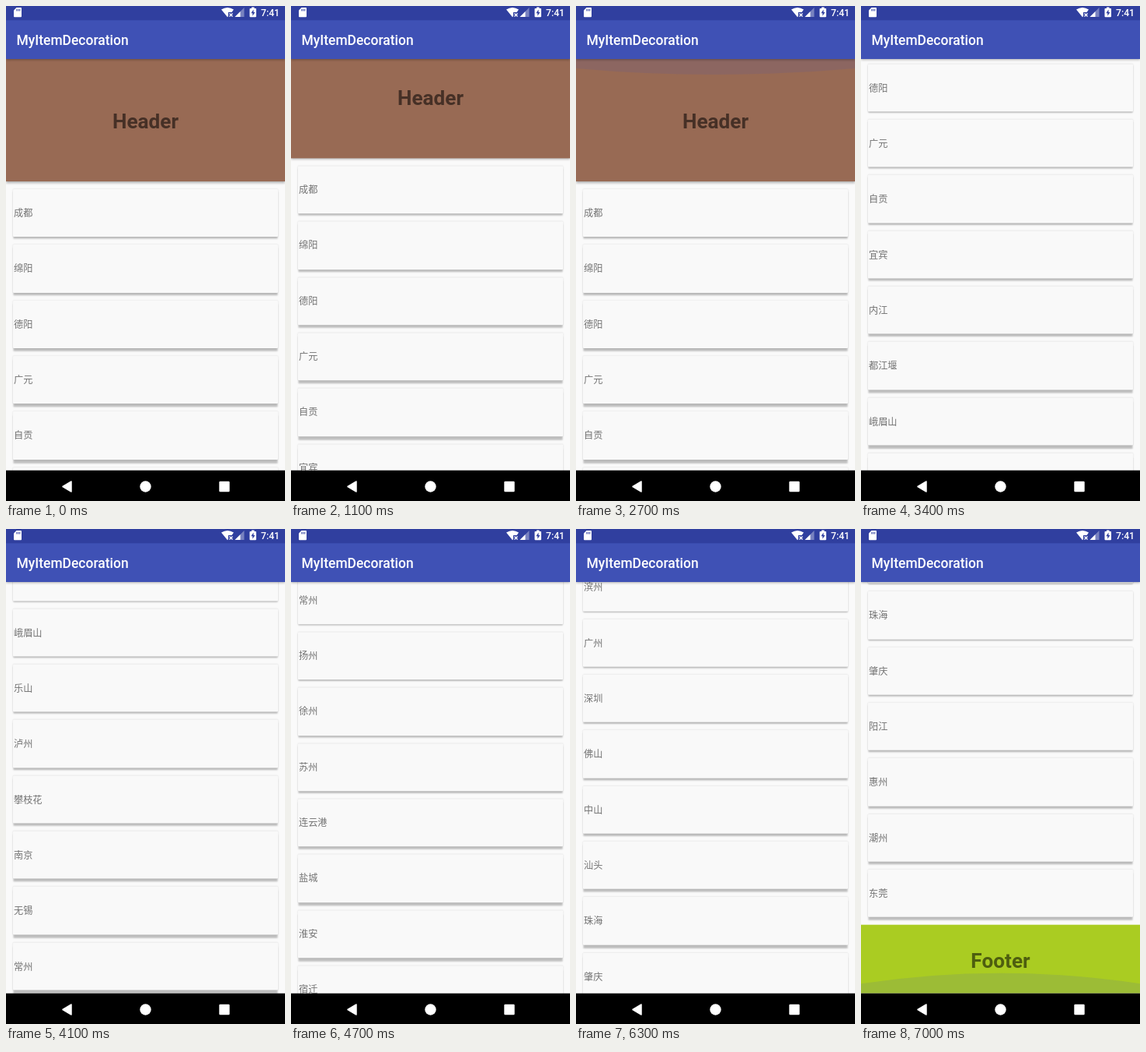
Recreate the animation shown at these times as an HTML page. Size 359x635 px, loop 8100 ms.

```html
<!DOCTYPE html>
<html lang="zh-CN">
<head>
<meta charset="utf-8">
<style>
html, body { margin: 0; width: 100%; height: 100%; overflow: hidden; background: #fafafa; }
#stage { position: absolute; left: 0; top: 0; width: 359px; height: 635px; overflow: hidden; background: #fafafa; }
#list { position: absolute; left: 0; top: 0; width: 359px; }
.card {
  position: absolute; left: 9px; width: 341px; height: 61.3px;
  background: #f9f9f9; border-radius: 1px; padding-left: 1px; box-sizing: border-box;
  font: 12.2px/61.3px "Noto Sans CJK SC", "Noto Sans CJK", sans-serif; color: rgba(0,0,0,.54);
}
.band {
  position: absolute; left: 0; width: 359px; padding-top: 2px; box-sizing: border-box;
  text-align: center; font: bold 26.2px Roboto, sans-serif; color: rgba(0,0,0,.54);
}
#header { top: 67.5px; height: 157px; line-height: 157px; background: #986a54; box-shadow: 0 2px 3px rgba(0,0,0,.3); }
#footer { height: 88px; line-height: 88px; background: #aacc22; }
svg { position: absolute; left: 0; top: 0; }
#bar { position: absolute; left: 0; top: 0; width: 359px; height: 67.5px; background: #3f51b5; box-shadow: 0 1px 3px rgba(0,0,0,.3); }
</style>
</head>
<body>
<div id="stage">
  <div id="list">
    <div id="header" class="band">Header</div>
    <div id="footer" class="band">Footer</div>
  </div>
  <svg width="359" height="635"><path id="glow" fill="#3f51b5" fill-opacity=".13"/></svg>
  <div id="bar"></div>
  <svg width="359" height="635" fill="#fff" font-family="Roboto, sans-serif" font-weight="500">
    <rect width="359" height="18.3" fill="#303f9f"/>
    <path d="M13.5 2H19q1 0 1 1V13.200q0 1-1 1H11q-1 0-1-1V5.500z"/>
    <path d="M13.800 4v2.500M15.800 4v2.500M17.800 4v2.500" stroke="#303f9f" stroke-width="1"/>
    <path d="M277 4.500Q285 -.5 293 4.500L290.500 8H286V13L285 14.200z"/>
    <path d="M287.500 9.500l4 4m0-4l-4 4" stroke="#fff" stroke-width="1.300"/>
    <path d="M306.500 2V14H294.500z" opacity=".35"/>
    <path d="M301.500 7V14H294.500z"/>
    <path d="M316 1.500h3.500V3H321q1 0 1 1v9.200q0 1-1 1H314.500q-1 0-1-1V4q0-1 1-1H316z"/>
    <path d="M318.500 4.500L315.300 9.300H317.300V12.700L320.400 8H318.500z" fill="#303f9f"/>
    <text x="328" y="13" font-size="12.2">7:41</text>
    <text x="13.500" y="49.800" font-size="17.47">MyItemDecoration</text>
    <rect y="595.700" width="359" height="40" fill="#000"/>
    <path d="M73 616.500L84 610V623z" stroke="#fff" stroke-width="1.500" stroke-linejoin="round"/>
    <circle cx="179.500" cy="616.500" r="7.200"/>
    <rect x="274.300" y="609.700" width="13.400" height="13.600" rx="1.200"/>
  </svg>
</div>
<script>
const cities = ('成都 绵阳 德阳 广元 自贡 宜宾 内江 都江堰 峨眉山 乐山 泸州 攀枝花 ' +
  '南京 无锡 常州 扬州 徐州 苏州 连云港 盐城 淮安 宿迁 泰州 南通 镇江 ' +
  '济南 青岛 威海 枣庄 泰安 临沂 东营 济宁 烟台 菏泽 聊城 德州 滨州 ' +
  '广州 深圳 佛山 中山 汕头 珠海 肇庆 阳江 惠州 潮州 东莞').split(' ');
const LOOP = 8100, TICK = 100, FIRST = 235, PITCH = 71.333, CARD = 61.3;
const TOP = 67.5, BOTTOM = 595.7, EDGE = 12.4;
const footTop = FIRST + PITCH * cities.length;
const maxScroll = footTop - 508;

const list = document.getElementById('list');
const glow = document.getElementById('glow');
document.getElementById('footer').style.top = footTop + 'px';

const cards = cities.map((name, i) => {
  const el = document.createElement('div');
  el.className = 'card';
  el.textContent = name;
  el.style.top = FIRST + PITCH * i + 'px';
  return list.appendChild(el);
});

const smooth = u => u * u * (3 - 2 * u);
const decay = u => 1 - (1 - u) ** 2;
const clamp = (v, lo, hi) => Math.min(hi, Math.max(lo, v));

// start time, number of ticks, destination, easing
const swipes = [
  [1000, 9, 235.1, smooth],
  [2000, 8, -100, decay],
  [3100, 4, 303.5, decay],
  [3600, 9, 753.5, decay],
  [4500, 9, 1508.2, decay],
  [5400, 7, 2425.5, decay],
  [6200, 9, 3450, decay]
];

function scrollAt(t) {
  let pos = 0;
  for (const [start, ticks, to, ease] of swipes) {
    if (t < start) break;
    const u = Math.min(1, (t - start + TICK) / (ticks * TICK));
    pos = clamp(pos + (to - pos) * ease(u), 0, maxScroll);
  }
  return pos;
}

// Overscroll glow: an arc that shrinks, then rests
function glowPath(t, scroll) {
  const arc = (base, dir, depth) =>
    `M0 ${base}V${base + dir * EDGE}Q179.5 ${base + dir * (2 * depth - EDGE)} 359 ${base + dir * EDGE}V${base}z`;
  if (t >= 2300 && t < 3100 && scroll === 0)
    return arc(TOP, 1, 20.5 + .04 * Math.max(0, 2700 - t));
  if (t >= 6200 && scroll === maxScroll)
    return arc(BOTTOM, -1, 26 + .09 * Math.max(0, 7000 - t));
  return '';
}

function draw(now) {
  const t = Math.floor(now % LOOP / TICK) * TICK;
  const scroll = scrollAt(t);
  list.style.transform = `translateY(${-scroll}px)`;
  cards.forEach((el, i) => {
    const y = FIRST + PITCH * i + CARD - scroll;
    const seen = y > 0 && y < 700;
    el.style.visibility = seen ? 'visible' : 'hidden';
    // Shadows lengthen towards the bottom of the screen
    if (seen) el.style.boxShadow =
      `0 ${1 + y / 140}px 2px -.5px rgba(0,0,0,.24), 0 0 2px rgba(0,0,0,.16)`;
  });
  glow.setAttribute('d', glowPath(t, scroll));
}

const began = performance.now();
function frame() {
  draw(performance.now() - began);
  requestAnimationFrame(frame);
}
frame();
</script>
</body>
</html>
```
